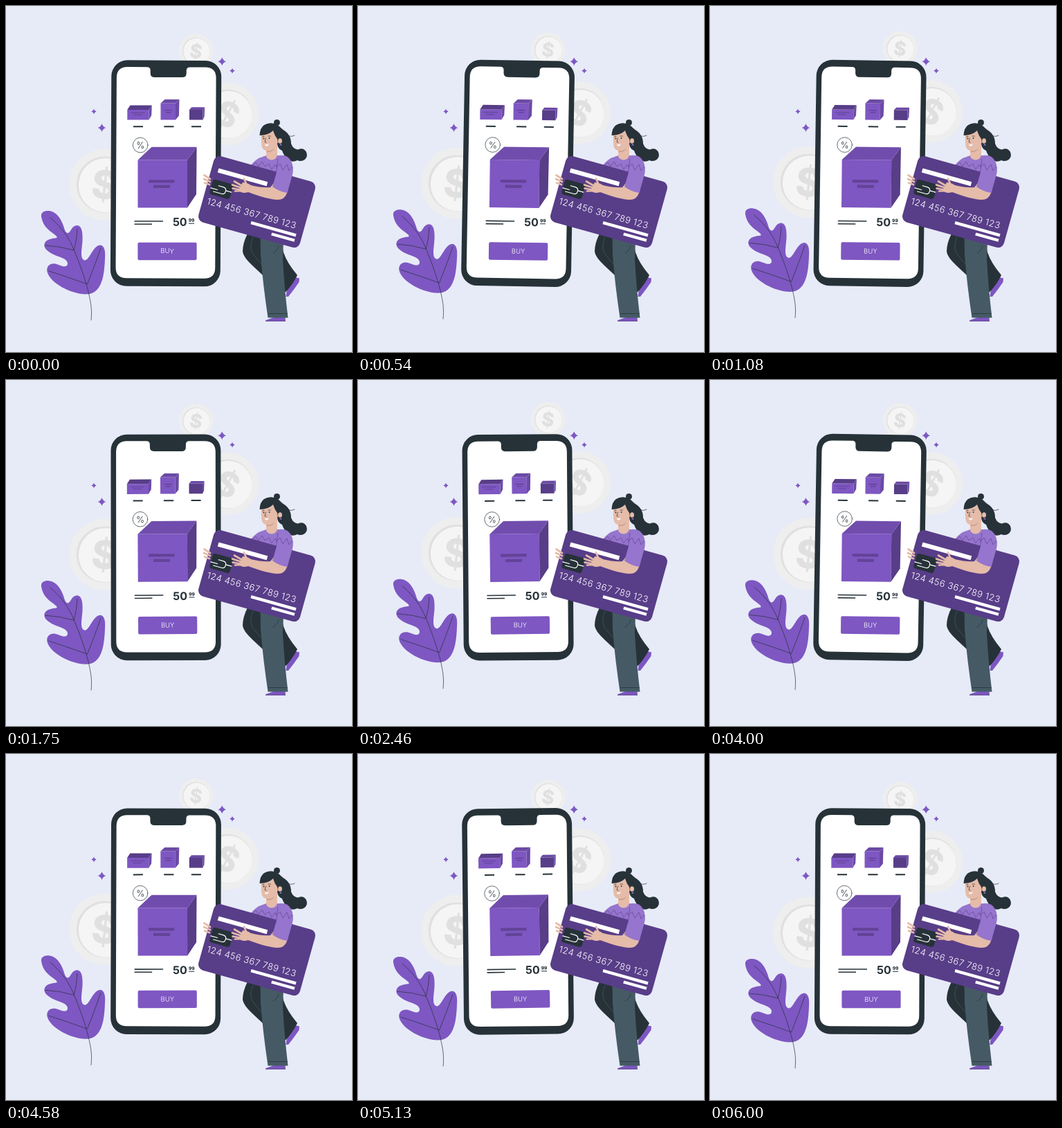
Animation of 500 by 500 pixels, one loop 6040 ms. Source, as an HTML page:

```html
<!DOCTYPE html>
<html lang="en">
<head>
<meta charset="utf-8">
<title>Mobile shopping</title>
<style>
  html, body { margin: 0; width: 100%; height: 100%; overflow: hidden; background: #e7ebf7; }
  svg { display: block; width: 100%; height: 100%; }
  text { font-family: Inter, "Open Sans", sans-serif; }
  .line { fill: none; stroke: #263238; stroke-width: .7; stroke-linecap: round; stroke-linejoin: round; }
  .dark { fill: #263238; }
  .violet { fill: #7e57c2; }
  .skin { fill: #e5bba9; }
  .finger { fill: none; stroke: #e5bba9; stroke-width: 2.7; stroke-linecap: round; }
  .zigzag { fill: none; stroke: #583d88; stroke-width: .6; }
</style>
</head>
<body>
<svg viewBox="0 0 500 500" xmlns="http://www.w3.org/2000/svg">
  <rect width="500" height="500" fill="#e7ebf7"/>

  <g id="coins"></g>

  <g id="leaf">
    <path class="violet" d="M51 304C50 298 56 295.500 62 296C73 297 80 308 83.500 319C85 325 87 328.500 90 328C94 326 95 317 103 317C110 318 111 328 110.500 339C110 350 106 366 114 367.500C121 367 125 347 136 345.500C143 346 143.800 356 143 365C142 394 137 417 115 416.500C94 416 64 401 59.500 384C58 376 64 371.500 71 372.500C78 374 85 379 88.500 374.500C91 369 85 365 76 362C65 358 54 352 55.500 344C57 337 67 336 73.500 335C75 332 66 328 60 322C54 316 52 310 51 304Z"/>
    <path class="line" d="M64 306C82 321 92 337 98 352C106 371 114 393 119 413C123 430 124.500 440 123 454M57 346Q78 347 98 353Q102 340 103 322M62 383Q90 392 117.500 402Q128 376 137 350"/>
  </g>

  <g id="phone">
    <g transform="rotate(.28 231.300 242)">
      <rect class="dark" x="151.600" y="78.600" width="158.900" height="326.500" rx="23"/>
      <path fill="#fff" d="M176 88.300H203Q208 88.300 208 93V97Q208 103 214 103H254Q260 103 260 97V93Q260 88.300 265 88.300H287Q302.900 88.300 302.900 104V378Q302.900 393.500 287 393.500H175Q159.200 393.500 159.200 378V104Q159.200 88.300 175 88.300Z"/>
    </g>
    <g id="boxes"></g>
    <g stroke="#263238" stroke-width="2">
      <path d="M184 174.300H198M228.300 174.300H242.500M268 174.300H282"/>
      <path d="M185.500 311H227M185.500 315.200H211" stroke-width="1.600"/>
      <path d="M264 314.300H272" stroke-width="1"/>
    </g>
    <circle class="line" cx="194.200" cy="201" r="10.800"/>
    <g class="dark" text-anchor="middle">
      <text x="194.300" y="206" font-size="13" font-weight="300">%</text>
      <text x="251.300" y="318" font-size="16" font-weight="700">50</text>
      <text x="268.100" y="312" font-size="6.500" font-weight="800">99</text>
    </g>
    <rect class="violet" x="190.400" y="341.700" width="85.200" height="25.500" rx="2"/>
    <text x="233" y="357.500" font-size="9.500" font-weight="300" fill="#fff" text-anchor="middle">BUY</text>
  </g>

  <g id="sparkles" class="violet"></g>

  <g id="woman">
    <path class="violet" d="M418 392L424 393.500L423.500 399Q416 410 408 420H404.500L406 409Z"/>
    <path class="dark" d="M349 329Q342 343 342 355Q343 363 356 375L371 389L404 413.500Q414 403 421 389Q406 371 401 356L398 340Z"/>
    <path class="line" style="stroke:#455a64" d="M357 334Q351 347 356 357L369 373"/>
    <path class="skin" d="M386 447H399L402 452H385Z"/>
    <path class="violet" d="M375 455.500Q374.500 454 380 452.500L388 449.500H403.500L404 455.500Z"/>
    <path d="M375 455H404" stroke="#583d88" stroke-width="1"/>
    <path fill="#455a64" d="M367.500 332L401 340L400 365Q402 405 407.500 450.500H378.500Q371 400 368 360Z"/>
    <path class="line" d="M379 444.500H406.500M394 347Q392 354 386 357"/>

    <path class="dark" d="M394 176Q405 180 409 187Q412 192 412 199Q415 207 422 207.500Q430 204 434 211Q437 219 430 223Q425 225 421 223Q413 227 408 222Q402 218 399 209Q391 206 392 195Z"/>
    <circle class="dark" cx="391.500" cy="168.500" r="4.500"/>
    <path class="line" d="M392 174Q401 177 404 184Q410 191 417 187"/>
    <path fill="#9575cd" d="M352 233Q356 226 365 220L376 216H394Q407 214 412 224Q417 234 413 248L406 265H360Z"/>
    <path class="skin" d="M376 203L392 199V216Q389 224 381 222Q376 220 376 216Z"/>
    <path d="M376.500 209Q384 209 389 204Q385 213 376.500 211Z" fill="#d3a18f"/>
    <path class="skin" d="M368.700 184Q369 181 379 177L393 184Q395 198 389 205Q382 211 374 208.500Q369 206 369 198Z"/>
    <path class="dark" d="M366.500 187Q367 176 373 172Q381 167 391 171Q402 177 402 190Q400 200 394 203L392 192Q388 187 386 180Q379 187 366.500 187Z"/>
    <ellipse class="skin" cx="396" cy="195" rx="3" ry="3.800"/>
    <circle cx="397" cy="200.500" r="1.500" fill="#9575cd" stroke="#263238" stroke-width=".5"/>
    <circle class="dark" cx="372.500" cy="191.500" r=".9"/>
    <circle class="dark" cx="380.500" cy="191" r=".9"/>
    <path class="line" d="M370.500 189L373 188.500M379 188L382.500 188M375.500 191L374 196.500L376 197"/>
    <path fill="#fff" d="M373.500 200Q377 201 380 199Q378.500 203 375.500 202.500Z"/>
    <path class="zigzag" d="M355 232L361 226L365 232L370 225L374 232L380 228L384 236L389 229L392 235"/>

    <g transform="translate(362.800 283.600) rotate(15.600)">
      <rect x="-76.500" y="-50" width="152.200" height="99" rx="9" fill="#583d88"/>
      <g fill="#fff">
        <rect x="-66.500" y="-32.500" width="73.500" height="6.400"/>
        <rect x="-.5" y="28.700" width="67.500" height="4.300"/>
        <rect x="32.500" y="36.400" width="34.500" height="4.300"/>
        <text x="-70" y="22" font-size="13" font-weight="300" letter-spacing=".4">124 456 367 789 123</text>
      </g>
      <rect class="dark" x="-70" y="-15.500" width="30.500" height="22.500" rx="4"/>
      <path class="line" style="stroke:#fff;stroke-width:1.200" d="M-70 -2H-60M-39.500 -4H-48M-65 2H-53Q-48 2 -48 -3T-53 -8H-60"/>
    </g>

    <path class="finger" d="M286.500 244.500L295 250M286 250L295 254M287 255.500L294 258"/>
    <path class="skin" d="M342 255Q348 255 354 259Q370 263 382 262L390 252L408 262Q406 277 397 279.500Q385 282 350 269Q341 272 336 266Z"/>
    <path class="finger" d="M343 261L330 253.500M341 263L327 258.500M341 266L327.500 263.500M343 267L331 267.500M348 259L344 249.500"/>
    <path fill="#9575cd" d="M393 219Q404 213 411 223Q417 233 413 247L406.500 270Q394 268 385 261L390 244Z"/>
    <path class="zigzag" d="M390 244L393 221M391 233L396 228L400 237L406 229L409 238L414 232"/>
  </g>
</svg>
<script>
  const $ = id => document.getElementById(id);
  const LOOP = 6040, CYCLE = 6000, SWAY = 3000;
  const MID = "#6b4aa5", DEEP = "#583d88", VIOLET = "#7e57c2";

  const coin = (x, y, r, tilt) => `<g transform="translate(${x} ${y})">
    <circle r="${r}" fill="#eeeeee"/>
    <circle r="${r * .79}" fill="#e0e0e0"/>
    <circle cx="${r * .03}" cy="${r * .02}" r="${r * .76}" fill="#f5f5f5"/>
    <text transform="rotate(${tilt})" y="${r * .4}" font-size="${r * 1.1}" font-weight="800"
      text-anchor="middle" fill="#e0e0e0">$</text></g>`;

  // Front face at (x, y), receding by (dx, dy); labels are [x, y, width, height].
  const box = (x, y, w, h, dx, topRight, dy, sideDrop, [front, top, side], labels) => {
    const r = x + w, b = y + h, t = y - dy;
    return `<rect x="${x}" y="${y}" width="${w}" height="${h}" fill="${front}"/>
      <path d="M${x} ${y}L${x + dx} ${t}H${topRight}L${r} ${y}Z" fill="${top}"/>
      <path d="M${r} ${y}L${topRight} ${t}L${topRight - .6} ${b - sideDrop}L${r} ${b}Z" fill="${side}"/>` +
      labels.map(([lx, ly, lw, lh]) =>
        `<rect x="${lx}" y="${ly}" width="${lw}" height="${lh}" fill="${DEEP}" opacity=".75"/>`).join("");
  };

  const sparkle = (x, y, r) => {
    const k = r * .22;
    return `<path transform="translate(${x} ${y})"
      d="M0 ${-r}Q${k} ${-k} ${r} 0Q${k} ${k} 0 ${r}Q${-k} ${k} ${-r} 0Q${-k} ${-k} 0 ${-r}Z"/>`;
  };

  $("coins").innerHTML = coin(274.7, 65, 25, 8) + coin(320, 156, 45, 28) + coin(142.5, 258, 51.5, 6);
  $("boxes").innerHTML =
    box(175.3, 150, 31.2, 14.6, 4.2, 210.8, 6.5, 6.5, [VIOLET, DEEP, MID], [[180.5, 153.7, 20, 1], [184, 156.8, 12, 1]]) +
    box(223.5, 140.5, 21.5, 24, 6, 250.5, 5.5, 6, [VIOLET, MID, MID], [[228.3, 149.9, 12, 1.4], [230.8, 153, 7.5, 1.4]]) +
    box(265, 150, 19.5, 14.5, 3.2, 287.2, 3.7, 4.5, [DEEP, MID, MID], [[269.5, 154.5, 10, 1], [271.5, 157, 6, 1]]) +
    box(190.5, 222.5, 71.5, 69, 20, 275.6, 18.7, 19.5, [VIOLET, "#704dad", DEEP], [[206, 251.2, 37.3, 4.2], [213, 258.7, 24, 4.2]]);
  $("sparkles").innerHTML =
    sparkle(312.2, 80.2, 6) + sparkle(327, 93.8, 3.7) + sparkle(138.5, 176, 6) + sparkle(127, 152.5, 3.7);

  function update(time) {
    const t = Math.min(time % LOOP, CYCLE);
    const lift = 10 * (1 - Math.abs(t / (CYCLE / 2) - 1));
    // Triangle wave: 0, 1, 0, -1 degrees over each sway.
    const phase = (t / SWAY + .25) % 1;
    const angle = 1 - Math.abs(phase * 4 - 2);
    for (const id of ["coins", "leaf"]) $(id).setAttribute("transform", `translate(0 ${-lift})`);
    $("phone").setAttribute("transform", `rotate(${angle} 231.3 242)`);
  }

  const start = performance.now();
  function frame() {
    update(performance.now() - start);
    requestAnimationFrame(frame);
  }
  frame();
</script>
</body>
</html>
```
